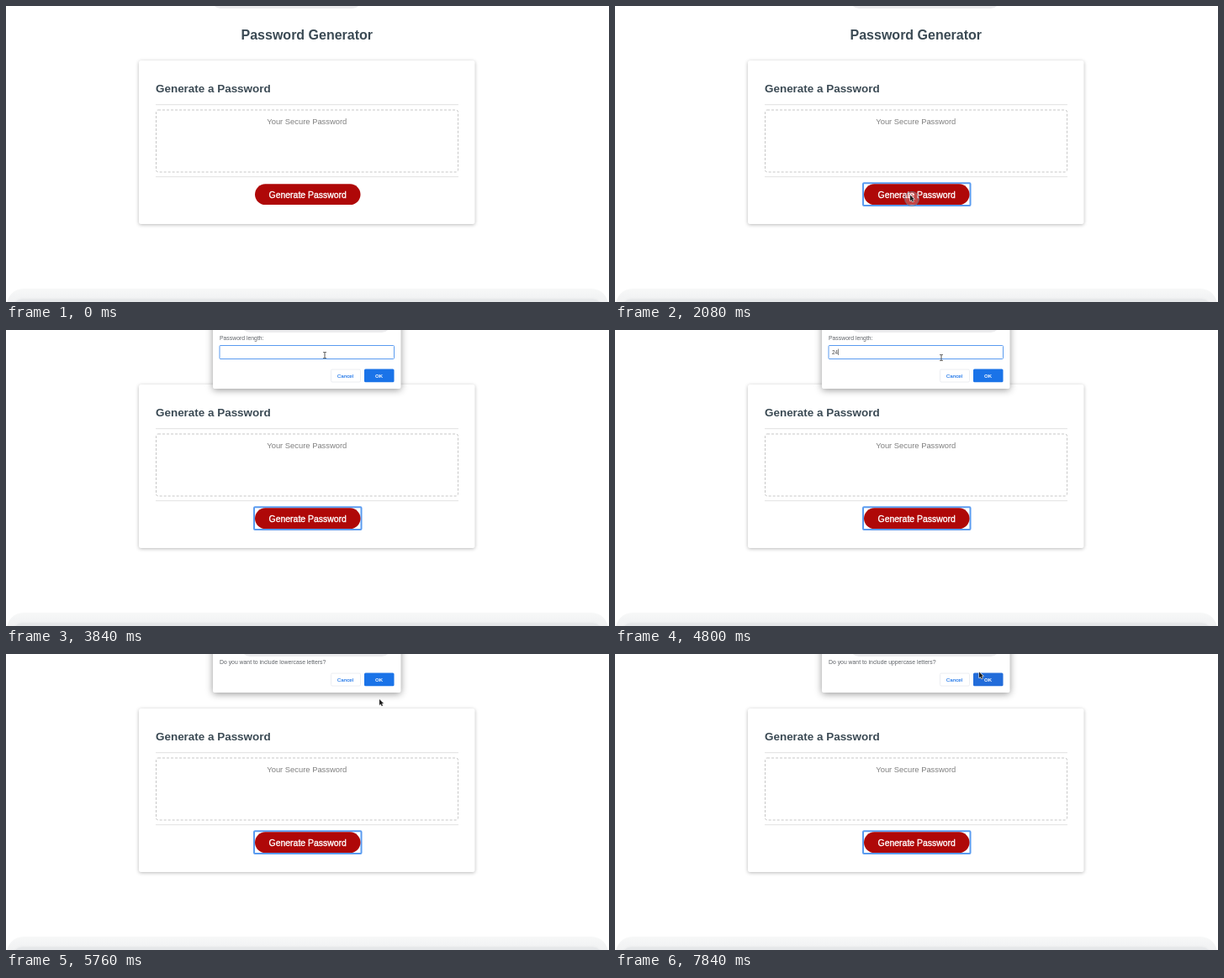
These frames come from a looping animation (717x353 px, 8 s). An HTML page with a canvas:

```html
<!DOCTYPE html>
<html lang="en">
<head>
<meta charset="utf-8">
<title>Password generator</title>
<style>
  html, body { margin: 0; width: 100%; height: 100%; overflow: hidden; background: #fff; }
  canvas { display: block; width: 717px; height: 353px; }
</style>
</head>
<body>
<canvas id="stage"></canvas>
<script>
const W = 717, H = 353, LOOP = 8000, TICK = 160;
const SANS = '"Liberation Sans", Arial, sans-serif';
const SLATE = '#3b4a54', BLUE = '#1a73e8', FOCUS = '#5a9bf0';

const canvas = document.getElementById('stage');
const ctx = canvas.getContext('2d');
const dpr = window.devicePixelRatio || 1;
canvas.width = W * dpr;
canvas.height = H * dpr;

// Pointer tip: [time, x, y]
const pointerPath = [
  [640, 439, 111], [800, 372, 180], [960, 326, 226], [1120, 335, 234],
  [1280, 335, 234], [1440, 342, 231], [1760, 351, 225.5],
  [2720, 351, 225.5], [2880, 353, 219], [3200, 376, 140], [3360, 389, 85],
  [3520, 388, 50], [3680, 384, 36], [3840, 379, 30],
  [4640, 379, 30], [4800, 388, 33], [5120, 430, 48], [5280, 444, 54],
  [6080, 444, 54], [6240, 443, 48], [6560, 429, 27], [6720, 437, 28],
  [7680, 437, 28], [7840, 433, 21.5]
];

const during = (t, from, to) => t >= from && t < to;

function pointerAt(t) {
  if (t < pointerPath[0][0]) return null;
  const next = pointerPath.findIndex(key => key[0] > t);
  if (next < 0) return pointerPath[pointerPath.length - 1].slice(1);
  const [t0, x0, y0] = pointerPath[next - 1];
  const [t1, x1, y1] = pointerPath[next];
  const k = (t - t0) / (t1 - t0);
  return [x0 + (x1 - x0) * k, y0 + (y1 - y0) * k];
}

function box(x, y, w, h, radius, { fill, stroke, line = 1, shadow, blur = 0, drop = 0, dash = [] }) {
  ctx.save();
  ctx.beginPath();
  ctx.roundRect(x, y, w, h, radius);
  if (shadow) {
    ctx.shadowColor = shadow;
    ctx.shadowBlur = blur * dpr;
    ctx.shadowOffsetY = drop * dpr;
  }
  if (fill) {
    ctx.fillStyle = fill;
    ctx.fill();
  }
  if (stroke) {
    ctx.strokeStyle = stroke;
    ctx.lineWidth = line;
    ctx.setLineDash(dash);
    ctx.stroke();
  }
  ctx.restore();
}

function label(text, x, baseline, size, color, { weight = 400, align = 'left', thicken = 0 } = {}) {
  ctx.font = `${weight} ${size}px ${SANS}`;
  ctx.textAlign = align;
  ctx.fillStyle = color;
  ctx.fillText(text, x, baseline);
  if (thicken) {
    ctx.strokeStyle = color;
    ctx.lineWidth = thicken;
    ctx.strokeText(text, x, baseline);
  }
}

function drawPage(focused) {
  ctx.fillStyle = '#fff';
  ctx.fillRect(0, 0, W, H);

  label('Password Generator', 357.8, 40, 16, SLATE, { weight: 700, align: 'center' });
  box(158, 65, 399.5, 195, 2.5, { fill: '#fff', shadow: 'rgba(0,0,0,.28)', blur: 4, drop: 1 });
  label('Generate a Password', 178, 103, 13.45, SLATE, { weight: 700 });

  ctx.fillStyle = '#e6e6e6';
  ctx.fillRect(178, 117, 360, 1.2);
  ctx.fillRect(178, 203, 360, 1.2);
  box(178.5, 124, 359, 74, 2.5, { stroke: '#c7c7c7', dash: [3, 2] });
  label('Your Secure Password', 357.8, 141.3, 9.4, '#7f7f7f', { align: 'center' });

  if (focused) box(295, 211.2, 127.5, 26.8, 1, { stroke: FOCUS, line: 2 });
  box(296, 212.3, 125.5, 24.7, 12.35, { fill: '#af0808' });
  label('Generate Password', 358.7, 228.7, 10.45, '#fff', { align: 'center', thicken: 0.35 });

  drawFooter();
}

function drawFooter() {
  const outer = ctx.createLinearGradient(0, 337, 0, H);
  outer.addColorStop(0, '#f7f8f8');
  outer.addColorStop(1, '#f0f1f2');
  box(1, 337, W - 2, 40, 20, { fill: outer });
  box(9, 349.5, W - 18, 30, 10, { fill: '#e5e7e9', shadow: '#e5e7e9', blur: 3 });
}

function drawDialog({ message, bottom, value, caret, okColor = BLUE }) {
  box(246, -40, 223.5, bottom + 40, 2, { fill: '#fff', shadow: 'rgba(0,0,0,.42)', blur: 8, drop: 1.5 });
  label(message, 254, 12, 6.85, '#5f6368');

  if (value !== undefined) {
    box(254, 18.5, 207.5, 16, 1, { fill: '#fff', stroke: FOCUS });
    label(value, 258, 28.7, 6.3, '#444');
    if (caret) {
      ctx.fillStyle = '#555';
      ctx.fillRect(258 + ctx.measureText(value).width, 22.5, 0.7, 7.5);
    }
  }

  const top = bottom - 23.5;
  box(386.5, top + 0.5, 35, 15, 1.5, { stroke: '#eceef2' });
  label('Cancel', 403.5, top + 10.1, 6.25, BLUE, { align: 'center', thicken: 0.12 });
  box(426, top, 35.5, 15.7, 1.5, { fill: okColor });
  label('OK', 443.6, top + 10.1, 6, '#fff', { weight: 700, align: 'center' });
}

function dialogAt(t) {
  if (during(t, 2240, 5600)) {
    return {
      message: 'Password length:',
      bottom: 70,
      value: t < 4320 ? '' : t < 4480 ? '2' : '24',
      caret: during(t, 2400, 2880) || during(t, 3360, 3840) || during(t, 4320, 4960) || t >= 5440,
      okColor: t >= 5440 ? '#437fd2' : t >= 5120 ? '#2a70d8' : BLUE
    };
  }
  if (during(t, 5760, 7200)) {
    return {
      message: 'Do you want to include lowercase letters?',
      bottom: 46,
      okColor: t >= 7040 ? '#437fd2' : t >= 6560 ? '#226cda' : BLUE
    };
  }
  if (t >= 7360) {
    return { message: 'Do you want to include uppercase letters?', bottom: 46, okColor: '#226cda' };
  }
  return null;
}

// Tab edge hanging from the top of the window
function drawTab(t) {
  const left = 245 + 35 * Math.min(t / 320, 1);
  box(left, -20, 177, 23, 10, { fill: '#ececee' });
}

function drawArrow(x, y) {
  ctx.save();
  ctx.translate(x, y);
  ctx.beginPath();
  [[0, 0], [0, 7], [1.6, 5.6], [2.7, 8], [4, 7.4], [2.9, 5.1], [5, 5]]
    .forEach(([px, py]) => ctx.lineTo(px, py));
  ctx.closePath();
  ctx.lineJoin = 'round';
  ctx.strokeStyle = '#e8e8e8';
  ctx.lineWidth = 1.2;
  ctx.stroke();
  ctx.fillStyle = '#222';
  ctx.fill();
  ctx.restore();
}

function drawBeam(x, y) {
  ctx.fillStyle = '#555';
  ctx.fillRect(x - 0.5, y - 3.5, 1, 7);
  ctx.fillRect(x - 2, y - 4, 4, 0.8);
  ctx.fillRect(x - 2, y + 3.2, 4, 0.8);
}

function drawPointer(t) {
  const tip = pointerAt(t);
  if (!tip) return;
  const [x, y] = tip;
  const pressed = [2080, 5440, 7040].includes(t);
  if (pressed) {
    box(x - 6.5, y - 4, 17, 17, 8.5, { fill: 'rgba(255,255,255,.25)', stroke: 'rgba(105,115,130,.8)' });
  }
  if (during(t, 3680, 4960)) drawBeam(x, y);
  else drawArrow(x, y);
}

function render(now) {
  const t = Math.floor((now % LOOP) / TICK) * TICK;
  ctx.setTransform(dpr, 0, 0, dpr, 0, 0);
  drawPage(t >= 2080);
  const dialog = dialogAt(t);
  if (dialog) drawDialog(dialog);
  drawTab(t);
  drawPointer(t);
}

const start = performance.now();
function loop() {
  render(performance.now() - start);
  requestAnimationFrame(loop);
}
loop();
</script>
</body>
</html>
```
